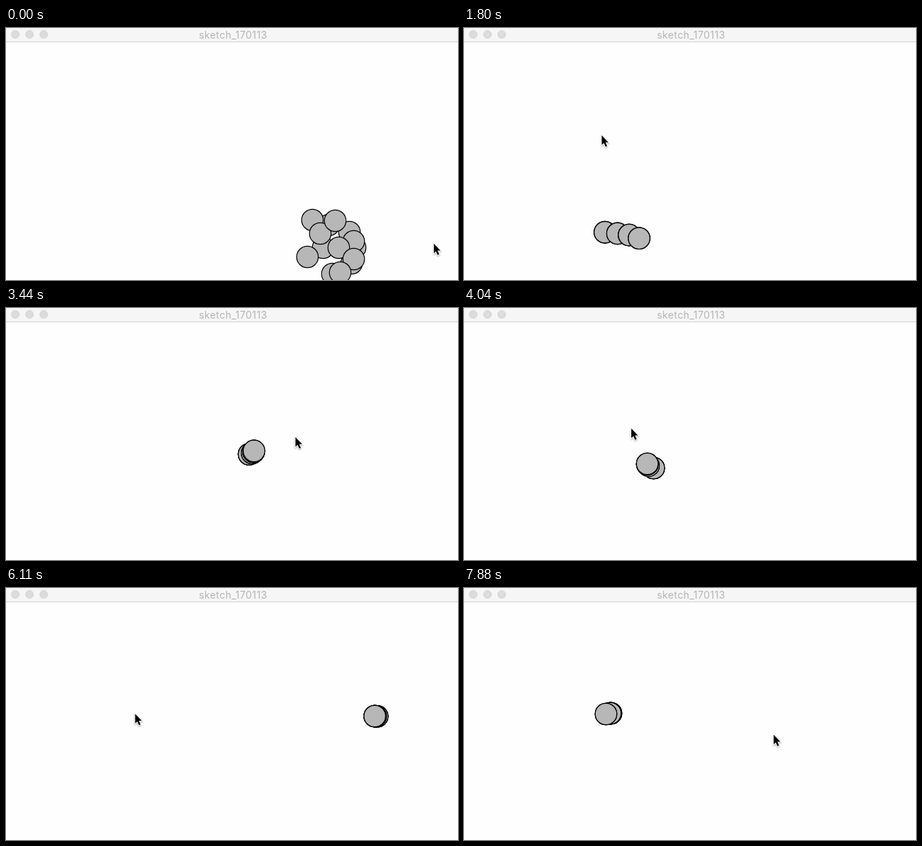
An HTML page with a canvas that plays this animation: 635x355 px, repeating every 8000 ms.

```html
<!DOCTYPE html>
<html lang="en">
<head>
<meta charset="utf-8">
<title>sketch_170113</title>
<style>
html, body { margin: 0; width: 635px; height: 355px; overflow: hidden; background: #fefefe; }
header {
  position: absolute; top: 0; left: 0; width: 635px; height: 20px; box-sizing: border-box;
  background: #f6f6f6; border-bottom: 1px solid #d2d2d2;
  font: 14px/19px Inter, "Liberation Sans", sans-serif; letter-spacing: .03em; color: #b4b4b4;
}
header span { position: absolute; left: 319px; transform: translateX(-50%); }
i {
  position: absolute; top: 3px; width: 12px; height: 12px; box-sizing: border-box;
  border: 1px solid #d5d5d5; border-radius: 50%; background: #dcdcdc;
}
canvas { position: absolute; top: 0; left: 0; }
</style>
</head>
<body>
<header><i style="left:7px"></i><i style="left:27px"></i><i style="left:47px"></i><span>sketch_170113</span></header>
<canvas id="stage" width="635" height="355"></canvas>
<script>
const ctx = document.getElementById('stage').getContext('2d');
const LOOP = 8000;

// The picture is refreshed every 150 ms, with a few 140 ms ticks.
const shortTicks = new Set([26, 28, 29, 43, 44, 51, 52]);
const tickAt = time => {
  let k = 0, end = 150;
  while (time >= end && k < 53) end += shortTicks.has(++k) ? 140 : 150;
  return k;
};

// Where the movers start, back to front
const starts = [
  [453, 277], [430, 270], [445, 309], [423, 322], [482, 287], [490, 309],
  [485, 331], [458, 346], [441, 289], [462, 271], [488, 300], [467, 309], [488, 325], [469, 344]
];

// Turning points of the front mover: tick, x, y
const lead = [
  [0, 460, 305], [6, 398, 222], [13, 223, 300], [15, 190, 277], [19, 290, 226], [22.5, 350, 200],
  [27, 257, 219], [29, 231, 186], [32, 296, 147], [35, 440, 165], [38.6, 536, 180],
  [44, 365, 180], [47, 228, 178], [50.2, 145, 177], [53, 199, 177]
];

// Offset of the rearmost mover, and how the rest bunch between: tick, dx, dy, power
const trail = [
  [0, 0, 0, 1], [6, -61, -16, 1], [19, -20, 3, 1.5], [27, 9, 6, 4],
  [35, 8, 2, 1.5], [47, -3, -1, 4], [53, 7, -1, .15]
];

// Turning points of the pointer: tick, x, y
const pointer = [
  [0, 601, 303], [4, 112, 160], [6, 233, 234], [8.5, 420, 110], [10, 330, 12], [12.5, 183, 190],
  [14, 240, 280], [19, 628, -1], [23, 340, 215], [27, 235, 169], [30, 395, 131], [35, 538, 184],
  [38, 230, 178], [46, 109, 174], [47, 137, 175], [52, 372, 183], [53, 435, 206]
];

// Smooth curve through the keys that comes to rest at each extreme
function curve(keys, k) {
  let i = 0;
  while (i < keys.length - 2 && k >= keys[i + 1][0]) i++;
  const a = keys[i], b = keys[i + 1], span = b[0] - a[0], u = (k - a[0]) / span;
  const slope = (n, c) => (keys[n + 1][c] - keys[n][c]) / (keys[n + 1][0] - keys[n][0]);
  const tangent = (n, c) => {
    if (n === 0) return slope(0, c);
    if (n === keys.length - 1) return slope(n - 1, c);
    const p = slope(n - 1, c), q = slope(n, c);
    return p * q > 0 ? 2 * p * q / (p + q) : 0;
  };
  return a.slice(1).map((v, j) => {
    const m = span * tangent(i, j + 1), n = span * tangent(i + 1, j + 1), d = b[j + 1] - v;
    return v + u * (m + u * (3 * d - 2 * m - n + u * (m + n - 2 * d)));
  });
}

function drawMovers(k) {
  const [x, y] = curve(lead, k), [dx, dy, power] = curve(trail, k);
  const scatter = Math.max(0, 1 - k / 19) ** 6;
  ctx.fillStyle = '#b7b7b7';
  ctx.strokeStyle = '#000';
  ctx.lineWidth = 1.2;
  starts.forEach(([sx, sy], n) => {
    const lag = (1 - Math.floor(n * 4 / starts.length) / 3) ** power;
    ctx.beginPath();
    ctx.arc(
      x + .5 + dx * lag + (sx - lead[0][1]) * scatter,
      y + .5 + dy * Math.sqrt(lag) + (sy - lead[0][2]) * scatter,
      15.2, 0, 2 * Math.PI
    );
    ctx.fill();
    ctx.stroke();
  });
}

const arrow = new Path2D('M0 0V13.5L3 10.7 5.3 16 7.6 15 5.3 9.8H9.4Z');

function drawPointer(k) {
  const [x, y] = curve(pointer, k);
  ctx.save();
  ctx.translate(x, y + .7);
  ctx.shadowColor = 'rgba(0,0,0,.35)';
  ctx.shadowBlur = 2;
  ctx.shadowOffsetY = 1;
  ctx.strokeStyle = '#fff';
  ctx.lineWidth = 2;
  ctx.stroke(arrow);
  ctx.shadowColor = 'transparent';
  ctx.fillStyle = '#000';
  ctx.fill(arrow);
  ctx.restore();
}

function draw() {
  const k = tickAt(performance.now() % LOOP);
  ctx.clearRect(0, 0, 635, 355);
  drawMovers(k);
  drawPointer(k);
  requestAnimationFrame(draw);
}
draw();
</script>
</body>
</html>
```
